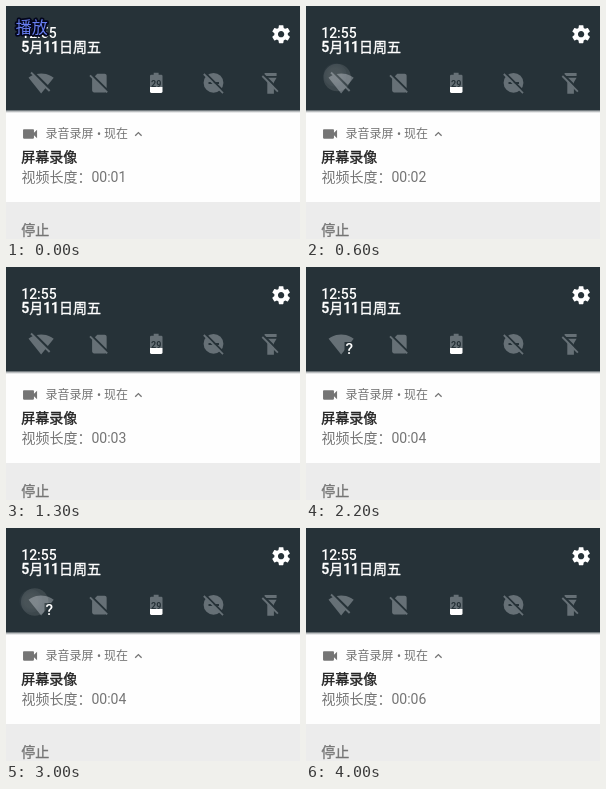
Recreate the animation shown at these times as an HTML page. Size 294x233 px, loop 4.1 s.

```html
<!DOCTYPE html>
<html lang="zh-CN">
<head>
<meta charset="utf-8">
<style>
  html, body { margin: 0; width: 100%; height: 100%; overflow: hidden; background: #fefefe; }
  svg { display: block; width: 294px; height: 233px; }
  text { font: 14px Roboto, "Noto Sans CJK SC", "Noto Sans CJK", sans-serif; }
  .head { font-weight: 500; fill: #fff; }
  .medium { stroke: currentColor; stroke-width: .35; }
  .grey { fill: #757575; color: #757575; }
  .off { fill: #667076; }
  .slash { fill: none; stroke: #667076; stroke-width: 1.8; }
  .gap { fill: none; stroke: #263238; stroke-width: 2; }
</style>
</head>
<body>
<svg viewBox="0 0 294 233">
  <defs>
    <radialGradient id="glow">
      <stop offset="0" stop-color="#e6e8e6" stop-opacity=".82"/>
      <stop offset=".55" stop-color="#e2e4e4" stop-opacity=".8"/>
      <stop offset=".72" stop-color="#c4cad2" stop-opacity=".68"/>
      <stop offset=".92" stop-color="#a4adbd" stop-opacity=".55"/>
      <stop offset="1" stop-color="#8c97b5" stop-opacity=".1"/>
    </radialGradient>
    <linearGradient id="shade" x2="0" y2="1">
      <stop offset="0" stop-color="#263238" stop-opacity=".5"/>
      <stop offset="1" stop-color="#263238" stop-opacity="0"/>
    </linearGradient>
    <clipPath id="panel"><path d="M0 0H294V104H0z"/></clipPath>
  </defs>

  <path fill="#263238" d="M0 0H294V104.6H0z"/>
  <path fill="url(#shade)" d="M0 104.6H294V107H0z"/>
  <path fill="#ececec" d="M0 196H294V233H0z"/>

  <text class="head" x="15.2" y="31.5">12:55</text>
  <text class="head medium" x="15.2" y="46" color="#fff">5月11日周五</text>
  <path fill="#fff" transform="translate(264.3 17.4) scale(.9)" d="M19.43 12.98c.04-.32.07-.64.07-.98s-.03-.66-.07-.98l2.11-1.65c.19-.15.24-.42.12-.64l-2-3.46c-.12-.22-.39-.3-.61-.22l-2.49 1c-.52-.4-1.08-.73-1.69-.98l-.38-2.65C14.46 2.18 14.25 2 14 2h-4c-.25 0-.46.18-.49.42l-.38 2.65c-.61.25-1.17.59-1.69.98l-2.49-1c-.23-.09-.49 0-.61.22l-2 3.46c-.13.22-.07.49.12.64l2.11 1.65c-.04.32-.07.65-.07.98s.03.66.07.98l-2.11 1.65c-.19.15-.24.42-.12.64l2 3.46c.12.22.39.3.61.22l2.49-1c.52.4 1.08.73 1.69.98l.38 2.65c.03.24.24.42.49.42h4c.25 0 .46-.18.49-.42l.38-2.65c.61-.25 1.17-.59 1.69-.98l2.49 1c.23.09.49 0 .61-.22l2-3.46c.12-.22.07-.49-.12-.64l-2.11-1.65zM12 15.5c-1.93 0-3.5-1.57-3.5-3.5s1.57-3.5 3.5-3.5 3.5 1.57 3.5 3.5-1.57 3.5-3.5 3.5z"/>

  <!-- quick settings -->
  <path id="wifiOff" class="off" transform="translate(22.2 64.2) scale(1.08)" d="M23.64 7c-.45-.34-4.93-4-11.64-4-1.5 0-2.89.19-4.15.48L18.18 13.8 23.64 7zm-6.6 8.22L3.27 1.44 2 2.72l2.05 2.06C1.91 5.76.59 6.82.36 7l11.63 14.49.01.01.01-.01 3.9-4.86 3.32 3.32 1.27-1.27-3.46-3.46z"/>
  <g id="wifiAsk">
    <path class="off" transform="translate(22.2 64.2) scale(1.08)" d="M12.01 21.49L23.64 7c-.45-.34-4.93-4-11.64-4C5.28 3 .81 6.66.36 7l11.63 14.49.01.01.01-.01z"/>
    <path fill="#263238" d="M38.5 75H49V89H38.5z"/>
    <text x="39.6" y="87" fill="#fff" style="font-size:15.5px;font-weight:500">?</text>
  </g>
  <path class="off" transform="translate(80.9 64.6) scale(1.04)" d="M18.99 5c0-1.1-.89-2-1.99-2h-7L7.66 5.34 19 16.68 18.99 5zM3.65 3.88L2.38 5.15 5 7.77V19c0 1.1.9 2 2 2h10.01c.35 0 .67-.1.96-.26l.9.9 1.27-1.27L3.65 3.88z"/>
  <path class="off" d="M144 81V70q0-1.3 1.3-1.3H147.7V66.8H152.6V68.7H155.2q1.3 0 1.3 1.3V81z"/>
  <path fill="#fff" d="M144 81H156.5V85.6q0 1.3-1.3 1.3H145.3q-1.3 0-1.3-1.3z"/>
  <text x="150.2" y="80.7" text-anchor="middle" fill="#263238" style="font-size:9px;font-weight:700">29</text>
  <g>
    <circle class="off" cx="207.5" cy="76.8" r="9.9"/>
    <path class="gap" d="M202.5 77H213"/>
    <path class="gap" d="M199.5 67.3L218.5 86.3"/>
    <path class="slash" d="M197.8 68L217 87.2"/>
  </g>
  <g transform="translate(-.4 -.2)">
    <path class="off" d="M259 67.3H271V70.3H259zM259 72H271L268.3 76.5V88H261.7V76.5z"/>
    <path class="gap" d="M258.3 69.2L273.3 84.2"/>
    <path class="slash" d="M256.7 70.2L272.3 85.8"/>
  </g>

  <!-- touch feedback -->
  <circle id="ripple" fill="#fff" clip-path="url(#panel)"/>
  <circle id="dot" r="12" fill="url(#glow)"/>

  <!-- notification -->
  <path class="grey" transform="translate(14.7 118.6) scale(.78)" d="M17 10.5V7c0-.55-.45-1-1-1H4c-.55 0-1 .45-1 1v10c0 .55.45 1 1 1h12c.55 0 1-.45 1-1v-3.5l4 4v-11l-4 4z"/>
  <text class="grey" x="39.5" y="132.2" style="font-size:12px">录音录屏 <tspan dx=".4">•</tspan> 现在</text>
  <path fill="none" stroke="#757575" stroke-width="1.3" d="M129.2 129.8l3.2-3.2 3.2 3.2"/>
  <text class="medium" x="15.2" y="156.3" fill="#212121" color="#212121">屏幕录像</text>
  <text class="grey" x="15.4" y="176">视频长度：<tspan id="count">00:01</tspan></text>
  <text class="grey medium" x="15.2" y="228.7">停止</text>

  <text id="play" x="9.8" y="27.2" fill="#687ff2" stroke="#03061c" stroke-width="3.4" stroke-linejoin="round" paint-order="stroke" style="font-size:16px">播放</text>
</svg>
<script>
const $ = id => document.getElementById(id);
const LOOP = 4100, STEP = 100;
const ticks = [400, 1300, 2200, 3100, 4000];
const taps = [{ start: 400, x: 29, y: 69 }, { start: 2800, x: 25, y: 73 }];
const home = { x: 34.5, y: 75.5 };

const show = (id, on) => $(id).style.display = on ? "" : "none";
const set = (id, attrs) => {
  for (const k in attrs) $(id).setAttribute(k, attrs[k]);
};

function drawTap(t) {
  const tap = taps.find(p => t >= p.start && t < p.start + 600);
  show("dot", tap);
  show("ripple", tap);
  if (!tap) return;
  const u = t - tap.start;
  const grow = Math.min(1, u / 300) ** 2.3;
  const mix = (a, b) => a + (b - a) * grow;
  set("dot", { cx: tap.x, cy: tap.y, opacity: Math.max(0, 1 - u / 300) ** 2.2 });
  set("ripple", {
    cx: mix(tap.x, home.x),
    cy: mix(tap.y, home.y),
    r: 35 * grow,
    opacity: u < 400 ? 0.11 : 0.06
  });
}

function frame(now) {
  const t = Math.floor(now % LOOP / STEP) * STEP;
  const ask = t >= 1800 && t < 3200;
  show("play", t < 300);
  show("wifiAsk", ask);
  show("wifiOff", !ask);
  $("count").textContent = "00:0" + (1 + ticks.filter(s => t >= s).length);
  drawTap(t);
  requestAnimationFrame(frame);
}
frame(0);
</script>
</body>
</html>
```
